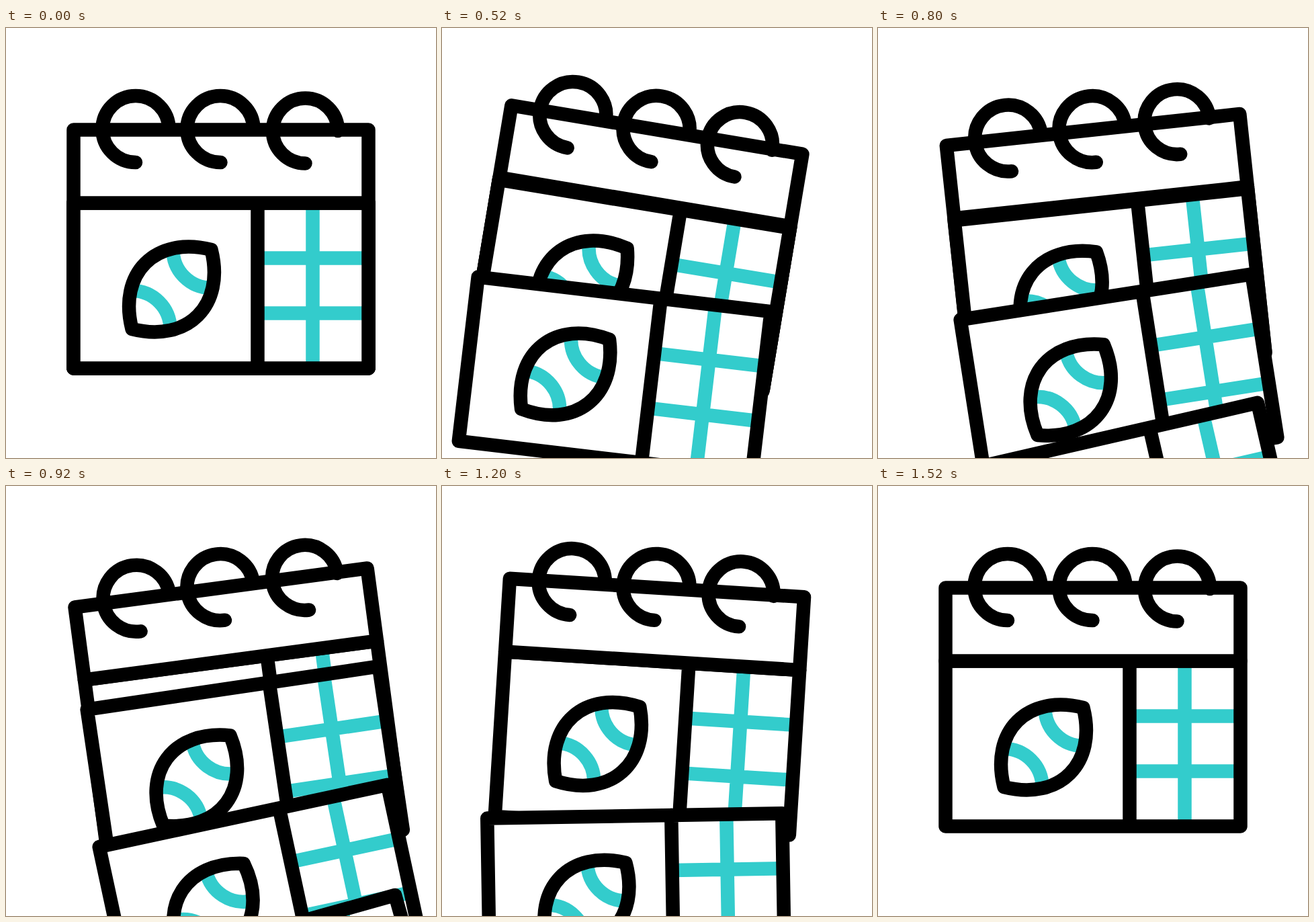
An HTML page for the animation above (1800 ms loop, 640 px wide and 640 px high).

```html
<!DOCTYPE html>
<html lang="en">
<head>
<meta charset="utf-8">
<title>Calendar</title>
<style>
  html, body { margin: 0; width: 100%; height: 100%; overflow: hidden; background: #fff; }
  svg { display: block; width: 100%; height: 100%; }
</style>
</head>
<body>
<svg viewBox="0 0 640 640" fill="none" stroke="#000" stroke-width="20.5" stroke-linecap="round" stroke-linejoin="round">
  <defs>
    <g id="page">
      <path fill="#fff" stroke="none" d="M100.5 260.5H539.5V506.5H100.5Z"/>
      <g stroke="#33cccc" stroke-linecap="butt">
        <path d="M456.5 260.5V506.5M374.5 342.5H539.5M374.5 424.5H539.5"/>
        <path d="M187.5 391A57 57 0 0 1 244.5 448M248.5 330A57 57 0 0 0 305.5 387"/>
      </g>
      <path d="M100.5 260.5H539.5V506.5H100.5ZM374.5 260.5V506.5"/>
      <path d="M187.5 448C166.5 365 222.5 309 305.5 330C326.5 413 270.5 469 187.5 448Z"/>
    </g>
  </defs>
  <g id="calendar">
    <use href="#page"/>
    <use class="sheet" href="#page"/>
    <use class="sheet" href="#page"/>
    <use class="sheet" href="#page"/>
    <path fill="#fff" d="M100.5 151.5H539.5V260.5H100.5Z"/>
    <path d="M242.5 150.5A49.5 49.5 0 1 0 193 200M368.5 150.5A49.5 49.5 0 1 0 319.5 200M494 153A48.5 48.5 0 1 0 445.5 201.5"/>
  </g>
</svg>
<script>
  const LOOP = 1800, STEP = 40;
  // Swing keys: [step, degrees]
  const SWING = [[5, 0], [12, 10], [22, -8], [31, 4], [38, 0]];
  const FALL_START = 5, FALL_STEPS = 21, FALL_DELAY = 7;

  const calendar = document.getElementById('calendar');
  // The last sheet in paint order is on top and falls first.
  const sheets = [...document.querySelectorAll('.sheet')].reverse();

  function ease(now, start, end) {
    const u = Math.min(1, Math.max(0, (now - start) / (end - start)));
    return u * u * (3 - 2 * u);
  }

  function swingAngle(now) {
    let angle = SWING[0][1];
    for (let i = 1; i < SWING.length; i++) {
      const [start, from] = SWING[i - 1], [end, to] = SWING[i];
      angle += (to - from) * ease(now, start, end);
    }
    return angle;
  }

  function draw(time) {
    const now = Math.floor((time % LOOP) / STEP);
    calendar.setAttribute('transform', `rotate(${swingAngle(now)} 320 151)`);
    sheets.forEach((sheet, i) => {
      const start = FALL_START + i * FALL_DELAY;
      const p = ease(now, start, start + FALL_STEPS);
      sheet.setAttribute('transform', `translate(${-4 * p} ${432 * p}) rotate(${-8.5 * p} 320 383.5)`);
    });
  }

  const origin = performance.now();
  function tick() {
    draw(performance.now() - origin);
    requestAnimationFrame(tick);
  }
  tick();
</script>
</body>
</html>
```
